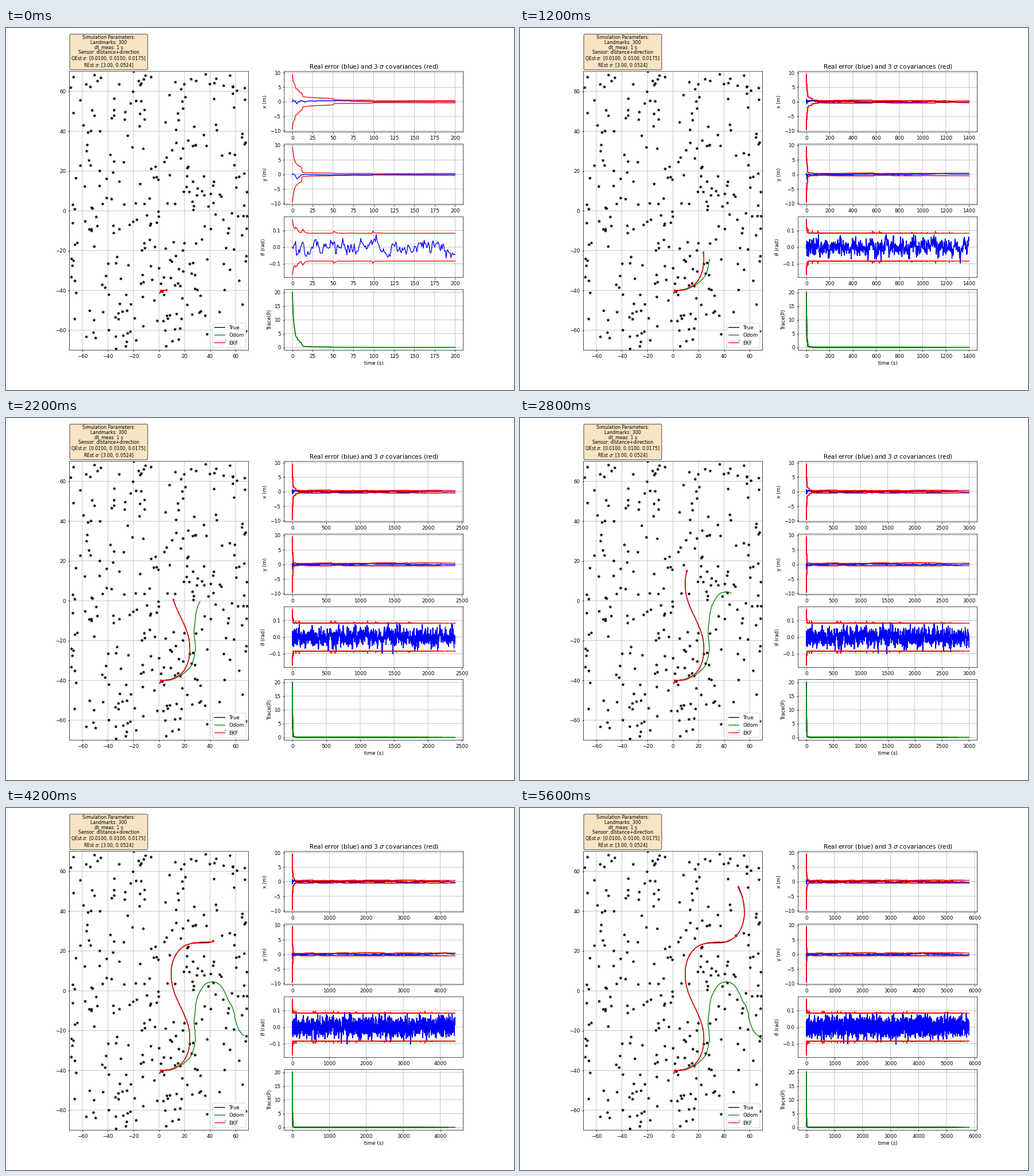
Recreate the animation shown at these times as a matplotlib script. Size 885 by 632 pixels, loop 5800 ms.

```python
from math import atan2, cos, hypot, pi, sin

import matplotlib.pyplot as plt
import numpy as np
from matplotlib.animation import FuncAnimation

W, H, DPI = 885, 632, 64
FRAMES, STEP, TOTAL = 29, 200, 6000
SEED, SPEED, DEPTH = 123456, 0.025, 8
LAST = FRAMES * STEP

SIG_Q = np.array([0.01, 0.01, pi / 180])
SIG_R = np.array([3.0, 3 * pi / 180])


def wrap(a):
    return (a + pi) % (2 * pi) - pi


def compose(pose, move):
    """Apply a body-frame move to a pose (x, y, heading)."""
    x, y, a = pose
    c, s = cos(a), sin(a)
    return np.array([x + c * move[0] - s * move[1],
                     y + s * move[0] + c * move[1],
                     wrap(a + move[2])])


def observe(pose, mark):
    dx, dy = mark[0] - pose[0], mark[1] - pose[1]
    return np.array([hypot(dx, dy), wrap(atan2(dy, dx) - pose[2])])


def simulate(marks):
    """Run an extended Kalman filter along the robot's winding route."""
    true = odom = est = np.array([1, -40, -pi / 2])
    cov = 10 * np.diag([1, 1, (pi / 180) ** 2])
    q, r = np.diag(SIG_Q ** 2), np.diag(SIG_R ** 2)
    log = [(true, odom, est, cov)]
    for k in range(1, LAST + 1):
        u = np.array([0, SPEED, 0.1 * pi / 180 * sin(3 * pi * k / TOTAL)])
        true = compose(true, u)

        # Odometry and prediction
        np.random.seed(SEED * 2 + k)
        noise = SIG_Q * np.random.randn(3)
        odom = compose(compose(odom, u), noise)
        u = u + noise
        c, s = cos(est[2]), sin(est[2])
        F = np.array([[1, 0, -s * u[0] - c * u[1]],
                      [0, 1, c * u[0] - s * u[1]],
                      [0, 0, 1]])
        G = np.array([[c, -s, 0], [s, c, 0], [0, 0, 1]])
        est = compose(est, u)
        cov = F @ cov @ F.T + G @ q @ G.T

        # Correction from one random landmark
        np.random.seed(SEED * 3 + k)
        mark = marks[:, np.random.randint(0, marks.shape[1] - 1)]
        z = observe(true, mark) + SIG_R * np.random.randn(2)
        dx, dy = mark - est[:2]
        d = hypot(dx, dy)
        J = np.array([[-dx / d, -dy / d, 0],
                      [dy / d ** 2, -dx / d ** 2, -1]])
        innov = z - observe(est, mark)
        innov[1] = wrap(innov[1])
        K = cov @ J.T @ np.linalg.inv(J @ cov @ J.T + r)
        est = est + K @ innov
        est[2] = wrap(est[2])
        cov = (np.eye(3) - K @ J) @ cov
        cov = (cov + cov.T) / 2
        log.append((true, odom, est, cov))
    return [np.array(part) for part in zip(*log)]


def ellipse(center, cov):
    """Three-sigma outline of the position estimate."""
    val, vec = np.linalg.eigh(cov[:2, :2])
    a = np.linspace(0, 2 * pi, 60)
    ring = np.array([np.cos(a), np.sin(a)]) * 3 * np.sqrt(val)[:, None]
    return center[:2, None] + vec @ ring


np.random.seed(SEED)
marks = 140 * (np.random.rand(2, 300) - 0.5)
true, odom, est, cov = simulate(marks)
error = est - true
error[:, 2] = wrap(error[:, 2])
sigma3 = 3 * np.sqrt(np.diagonal(cov, axis1=1, axis2=2))
trace = np.trace(cov, axis1=1, axis2=2)
time = np.arange(LAST + 1)

plt.rcParams["font.family"] = "DejaVu Sans"
plt.rcParams["font.size"] = 9.875
plt.rcParams["path.snap"] = False
fig = plt.figure(figsize=(W / DPI, H / DPI), dpi=DPI)

# Map; one colour per star keeps their sub-pixel positions
world = fig.add_subplot(1, 2, 1)
world.scatter(*marks, s=34, marker="*", c=["k"] * marks.shape[1],
              linewidths=0.9, joinstyle="bevel", zorder=2)
paths = [(world.plot([], [], color, label=name)[0], data)
         for color, name, data in (("k", "True", true), ("g", "Odom", odom),
                                   ("r", "EKF", est))]
ring, = world.plot([], [], "r")
world.axis([-70, 70, -70, 70])
world.grid(True)
world.legend(loc="lower right")
info = "\n".join([
    "Simulation Parameters:", "Landmarks: 300", "dt_meas: 1 s",
    "Sensor: distance+direction",
    r"QEst $\sigma$: [0.0100, 0.0100, 0.0175]",
    r"REst $\sigma$: [3.00, 0.0524]"])
world.text(113.4, H - 70.6, info, transform=None, size=8.89, ha="left",
           va="bottom", multialignment="center", linespacing=0.96,
           bbox=dict(boxstyle="round", facecolor="wheat", alpha=0.8))

# Error plots
labels = ["x (m)", "y (m)", r"$\theta$ (rad)", "Trace(P)"]
plots, curves = [], []
for row, label in enumerate(labels):
    ax = fig.add_subplot(4, 2, 2 * row + 2)
    if row < 3:
        group = [("b", error[:, row], 1.5), ("r", sigma3[:, row], 1.5),
                 ("r", -sigma3[:, row], 1.5)]
    else:
        group = [("g", trace, 2)]
    # Each refresh is painted over the earlier ones, which hardens the edges.
    for age in reversed(range(DEPTH)):
        for color, data, width in group:
            line, = ax.plot([], [], color, lw=width)
            curves.append((line, data, age))
    values = np.concatenate([g[1] for g in group])
    lo, hi = values.min(), values.max()
    pad = 0.05 * (hi - lo)
    ax.set_ylim(lo - pad, hi + pad)
    ax.set_ylabel(label)
    ax.grid(True)
    plots.append(ax)
plots[0].set_title(r"Real error (blue) and 3 $\sigma$ covariances (red)")
plots[-1].set_xlabel("time (s)")


def draw(i):
    now = (i + 1) * STEP
    for line, data in paths:
        line.set_data(data[:now + 1, 0], data[:now + 1, 1])
    ring.set_data(*ellipse(est[now], cov[now]))
    for line, data, age in curves:
        past = now - age * STEP
        end = past + 1 if past > 0 else 0
        line.set_data(time[:end], data[:end])
    for ax in plots:
        ax.set_xlim(-0.05 * now, 1.05 * now)
    return []


anim = FuncAnimation(fig, draw, frames=FRAMES, interval=200,
                     init_func=lambda: draw(0), repeat=True)
plt.show()
```
